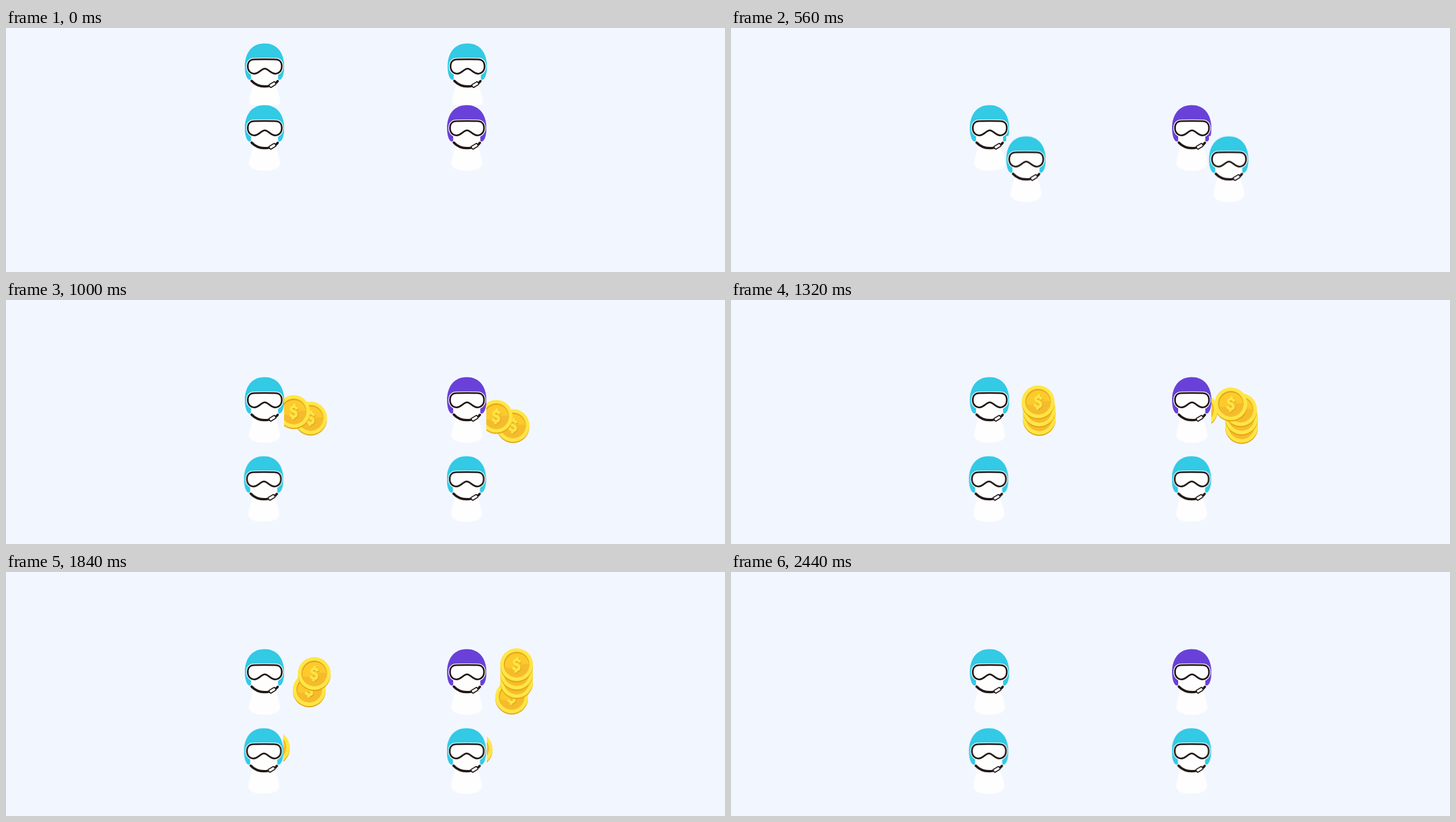
Animation of 1280 by 435 pixels, one loop 2880 ms. Source, as an HTML page:

```html
<!DOCTYPE html>
<html lang="en">
<head>
<meta charset="utf-8">
<title>Riders and coins</title>
<style>
  html, body { margin: 0; width: 100%; height: 100%; overflow: hidden; background: #f2f6ff; }
  #stage { position: relative; width: 1280px; height: 435px; overflow: hidden; }
  #stage svg { position: absolute; left: 0; top: 0; display: block; }
  .rider { width: 70.5px; height: 117.7px; background: #f2f6ff; color: #32cae4; z-index: 3; }
  .lead { color: #6941d8; }
  .mover { z-index: 2; }
  .coin { width: 60px; height: 62px; z-index: 1; }
  .defs { width: 0; height: 0; }
</style>
</head>
<body>
<div id="stage">
  <svg class="defs">
    <symbol id="rider" viewBox="0 0 70.5 117.7">
      <path fill="#fefefe" d="M17 68C14 80 9 92 8 103C7.5 112 18 117.6 35.5 117.6C53 117.6 63.500 112 63 103C62 92 56 80 53.500 68Z"/>
      <path fill="currentColor" d="M35.300 .4C57 .4 70.300 16 70.300 42C70.300 55 66.500 65.500 61.500 65.500C60 65.500 59.200 64 59.200 62V45H11.300V62C11.300 64 10.500 65.500 9 65.500C4 65.500 .2 55 .2 42C.2 16 13.500 .4 35.300 .4Z"/>
      <path fill="#fefefe" d="M11.300 45V66C18 74 27 77 35.500 77C44 77 53 74 59.200 66V45Z"/>
      <g stroke="#fefefe" stroke-width="5.6" fill="#fefefe"><use href="#goggles"/></g>
      <g stroke="#231815" stroke-width="3" fill="#fefefe"><use href="#goggles"/></g>
      <g fill="none" stroke="#231815" stroke-linecap="round">
        <path stroke-width="4.2" d="M12.200 67.300C18.500 74 27 77.200 35.500 77.200C39 77.200 41.500 76.900 44 76.200"/>
        <path stroke-width="4.2" d="M56.500 70.200L58.700 67.700"/>
        <rect x="-6" y="-3" width="12" height="6" rx="1.8" fill="#fefefe" stroke-width="1.8" transform="translate(49.400 73.900) rotate(-31)"/>
      </g>
    </symbol>
    <path id="goggles" d="M17 29Q35.700 28.400 54.400 29C62 29 66 34 66 41.500C66 49 61 54.400 54.500 54.400C46 54.400 42 45.500 35.700 45.500C29.400 45.500 25.400 54.400 17 54.400C10.400 54.400 5.400 49 5.400 41.500C5.400 34 9.400 29 17 29Z"/>
    <symbol id="coin" viewBox="-30 -31 60 62">
      <circle cy="1.1" r="29.200" fill="#e0a010"/>
      <circle cy="-1" r="29.200" fill="#ffe645"/>
      <circle cy="-1.200" r="22.700" fill="#dfa017"/>
      <circle cx=".4" cy="-.2" r="21.600" fill="#fcca2c"/>
      <path fill="#f6bb2d" d="M-21 3C-14 6 -6 5 0 1S14 -3 21.900 -2A21.600 21.600 0 0 1 -21 3Z"/>
      <g fill="none" stroke-width="4.600" transform="rotate(6)">
        <use href="#dollar" stroke="#dfa31d" x="1.300" y="1.200"/>
        <use href="#dollar" stroke="#ffe645"/>
      </g>
    </symbol>
    <path id="dollar" d="M5.200 -5.500C4.500 -8.500 2.500 -9.500 0 -9.500C-3 -9.500 -5 -8 -5 -5.500C-5 -2.500 -2.500 -1.800 0 -1C2.800 -.2 5.200 .8 5.200 4C5.200 6.700 3 8 0 8C-3 8 -5 6.800 -5.500 3.800M0 -14.500V-9M0 7.500V13"/>
  </svg>
</div>
<script>
  const LOOP = 2880;
  const stage = document.getElementById('stage');

  function add(shape, cls, x, y) {
    const svg = document.createElementNS('http://www.w3.org/2000/svg', 'svg');
    svg.setAttribute('class', cls);
    svg.innerHTML = `<use href="#${shape}"/>`;
    svg.style.left = x + 'px';
    svg.style.top = y + 'px';
    stage.append(svg);
    return svg;
  }

  const loop = (el, frames) => el.animate(frames, { duration: LOOP, iterations: Infinity });
  const hop = (ms, x, y) => ({
    offset: ms / LOOP, easing: 'ease', transform: `translate(${x}px, ${y}px)`
  });

  function addMover(x) {
    const el = add('rider', 'rider mover', x, 27);
    loop(el, [
      hop(0, 0, 0), hop(20, 0, 0), hop(440, 136.3, 73.9),
      hop(840, -1.5, 251), hop(LOOP, -1.5, 251)
    ]);
    // passes behind the standing rider first, then in front
    loop(el, [
      { offset: 0, zIndex: 2 }, { offset: 440 / LOOP, zIndex: 2 },
      { offset: 440 / LOOP, zIndex: 4 }, { offset: 1, zIndex: 4 }
    ]);
  }

  const leave = [1658, 1804, 1924, 2044, 2164];

  // coins go from the upper rider to a pile, then to the lower rider
  function addCoins(count, homeX, pileX, pileY) {
    for (let i = 0; i < count; i++) {
      const el = add('coin', 'coin', -30, -31);
      const start = 732 + 132 * i, y = pileY - 15 * i;
      loop(el, [
        hop(0, homeX, 204), hop(start, homeX, 204),
        hop(start + 400, pileX, y), hop(leave[i], pileX, y),
        hop(leave[i] + 360, homeX, 337.5), hop(LOOP, homeX, 337.5)
      ]);
    }
  }

  addCoins(3, 459, 548.7, 212);
  addCoins(5, 820, 909, 226.3);
  add('rider', 'rider', 424.5, 137);
  add('rider', 'rider lead', 784.5, 137);
  addMover(424.5);
  addMover(786);
</script>
</body>
</html>
```
